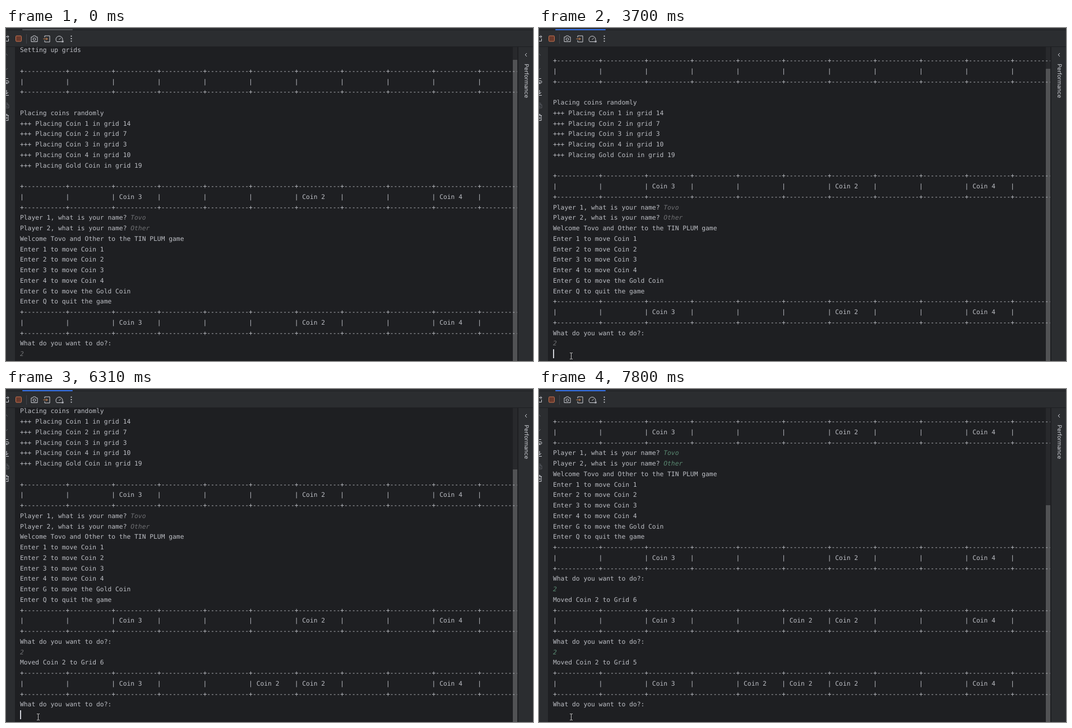
These frames come from a looping animation (940 by 596 pixels, 8000 ms). An HTML page:

```html
<!DOCTYPE html>
<html lang="en">
<head>
<meta charset="utf-8">
<title>Console game</title>
<style>
  html, body { margin: 0; width: 100%; height: 100%; overflow: hidden; background: #2b2d30; }
  #stage { position: relative; width: 940px; height: 596px; overflow: hidden; }
  #stage > *, #console > * { position: absolute; }
  #console { left: 16px; top: 34px; width: 896px; height: 562px; overflow: hidden; background: #1e1f22; }
  #track { left: 888px; top: 0; width: 8px; height: 562px; background: #28292c; }
  #thumb { left: 888px; width: 8px; background: #515254; }
  #text {
    left: 9px; margin: 0; color: #bcbec4; white-space: pre;
    font: 11.316px/18.75px "DejaVu Sans Mono", monospace;
    text-rendering: geometricPrecision; font-variant-ligatures: none;
  }
  #text i { color: var(--input); }
  #caret { top: 575px; width: 1.5px; height: 16px; background: #ced0d6; }
  svg { left: 0; top: 0; fill: none; stroke: #ced0d6; stroke-width: 1; }
  svg text { font: 10px Inter, sans-serif; fill: #ced0d6; stroke: none; text-rendering: geometricPrecision; }
</style>
</head>
<body>
<div id="stage">
  <div id="console">
    <div id="track"></div>
    <div id="thumb"></div>
    <pre id="text"></pre>
  </div>
  <svg width="940" height="596">
    <g stroke="#1e1f22">
      <path d="M0 3.5H940M0 33.5H940"/>
      <path d="M913 34V596" stroke-width="2"/>
    </g>
    <path id="tab" d="M30 3H118" stroke-width="2" stroke-linecap="round"/>
    <!-- toolbar -->
    <path d="M0 15.5H4.5M2.5 13L5 15.5L2.5 18M4.5 19V23.5H0"/>
    <rect x="17.5" y="14" width="10" height="10" rx="1.5" fill="#69392c" stroke="#c77551"/>
    <path d="M36.5 11V28" stroke="#43454a"/>
    <path d="M45 16H47.5L48.5 14H52.5L53.5 16H56V24.5H45Z"/>
    <circle cx="50.5" cy="20" r="2.3"/>
    <path d="M69 17V14H78V25H69V22"/>
    <path d="M66.5 19.5H74M71.5 17L74 19.5L71.5 22" stroke="#d58a55"/>
    <path d="M90.5 24.5A6 6 0 1 1 99.5 24.5ZM94.5 21L98 17.5"/>
    <path d="M102.5 22V25.5H99Z" fill="#ced0d6" stroke="none"/>
    <path d="M116.5 14.5V14.6M116.5 19V19.1M116.5 23.5V23.6" stroke-width="2.2" stroke-linecap="round"/>
    <!-- left strip -->
    <path d="M0 46L3 49M0 75L3 72" stroke="#5a5d63"/>
    <path d="M0 90.5H4M0 94.5H3A2 2 0 0 1 3 98.5H0M2 96.5L0 98.5L2 100.5"/>
    <path d="M0 117L1 118L4 115M1 111V118M0 120.5H5"/>
    <path d="M0 134.5H3V137M0 137.5H5V143H0M0 140.5H3" stroke="#5a5d63"/>
    <path d="M0 156.5H5M0 154.5H2V156M4 157V165.5H0M1.5 159V163"/>
    <!-- right strip -->
    <path d="M929 45L926 48L929 51"/>
    <text transform="translate(924.5 64) rotate(90)">Performance</text>
  </svg>
  <div id="caret"></div>
  <svg id="mouse" width="20" height="24">
    <path id="arrow" d="M0 0V14L3.3 11L5.5 16L8 15L5.8 10H10Z" fill="#fff" stroke="#000" stroke-width=".8"/>
    <path id="beam" d="M2 .5H4L4.5 1L5 .5H7M4.5 1V11M2 11.5H4L4.5 11L5 11.5H7" stroke="#c4c4c4"/>
  </svg>
</div>
<script>
const $ = id => document.getElementById(id);
const LOOP = 8000, ROW = 18.75, TOP = -2.55;
const GRAY = '#6f7073', GREEN = '#5f9367', TEAL = '#5a8a72';

const edge = '+-----------'.repeat(11);
const board = (coins = {}) => [
  edge,
  Array.from({ length: 11 }, (_, i) => ('| ' + (coins[i + 1] || '')).padEnd(12)).join(''),
  edge
];
const input = s => `<i>${s}</i>`;
const ask = 'What do you want to do?:';
const start = { 3: 'Coin 3', 7: 'Coin 2', 10: 'Coin 4' };
const second = { ...start, 6: 'Coin 2' };
const third = { ...second, 5: 'Coin 2' };

const lines = [
  'Setting up grids', '', ...board(), '',
  'Placing coins randomly',
  ...[14, 7, 3, 10].map((n, i) => `+++ Placing Coin ${i + 1} in grid ${n}`),
  '+++ Placing Gold Coin in grid 19', '',
  ...board(start),
  'Player 1, what is your name? ' + input('Tovo'),
  'Player 2, what is your name? ' + input('Other'),
  'Welcome Tovo and Other to the TIN PLUM game',
  ...[1, 2, 3, 4].map(n => `Enter ${n} to move Coin ${n}`),
  'Enter G to move the Gold Coin',
  'Enter Q to quit the game',
  ...board(start), ask, input(2),
  'Moved Coin 2 to Grid 6', ...board(second), ask, input(2),
  'Moved Coin 2 to Grid 5', ...board(third), ask
];

// time, scrolled rows, lines printed, thumb top, thumb bottom, input colour
const views = [
  [0, 0, 30, 57, 596, GRAY],
  [3700, 1, 30, 73, 596, GRAY],
  [3900, 2.55, 35, 92, 552, GREEN],
  [4000, 6, 35, 144, 596, GRAY],
  [6390, 6, 36, 144, 596, GRAY],
  [6810, 7, 37, 143, 538, GREEN],
  [6910, 12, 41, 208, 596, TEAL]
];
// time, x (none = hidden)
const carets = [
  [0], [2890, 32], [3300], [3700, 25], [3900], [4000, 25], [4790],
  [5300, 25], [5800], [6310, 25], [6390, 32], [6810], [6910, 25], [7800]
];
// time, left, top (none = off stage)
const moves = [
  [0], [380, 800, 583], [480, 655, 577], [580, 501, 584], [680],
  [2180, -4, 578], [2280, 4, 580], [2380, 22, 583], [2480, 42, 584],
  [2580, 51, 583], [2780, 52, 583], [3080, 52, 582], [3300, 52.5, 581]
];

const at = (keys, t) => keys.findLast(k => k[0] <= t);
const show = (el, on) => { el.style.display = on ? '' : 'none'; };
let printed = 0;

function draw(t) {
  const [, scroll, count, top, bottom, color] = at(views, t);
  if (count !== printed) {
    $('text').innerHTML = lines.slice(0, count).join('\n');
    printed = count;
  }
  $('text').style.top = TOP - scroll * ROW + 'px';
  $('text').style.setProperty('--input', color);
  $('thumb').style.top = top - 34 + 'px';
  $('thumb').style.height = bottom - top + 'px';
  $('tab').style.stroke = t < 2780 ? '#57595d' : '#3574f0';

  const [, caretX] = at(carets, t);
  show($('caret'), caretX);
  $('caret').style.left = caretX + 'px';

  const [, x, y] = at(moves, t);
  show($('mouse'), y);
  $('mouse').style.left = x + 'px';
  $('mouse').style.top = y + 'px';
  show($('arrow'), x < 16);
  show($('beam'), x >= 16);
}

function tick() {
  draw(performance.now() % LOOP);
  requestAnimationFrame(tick);
}
tick();
</script>
</body>
</html>
```
